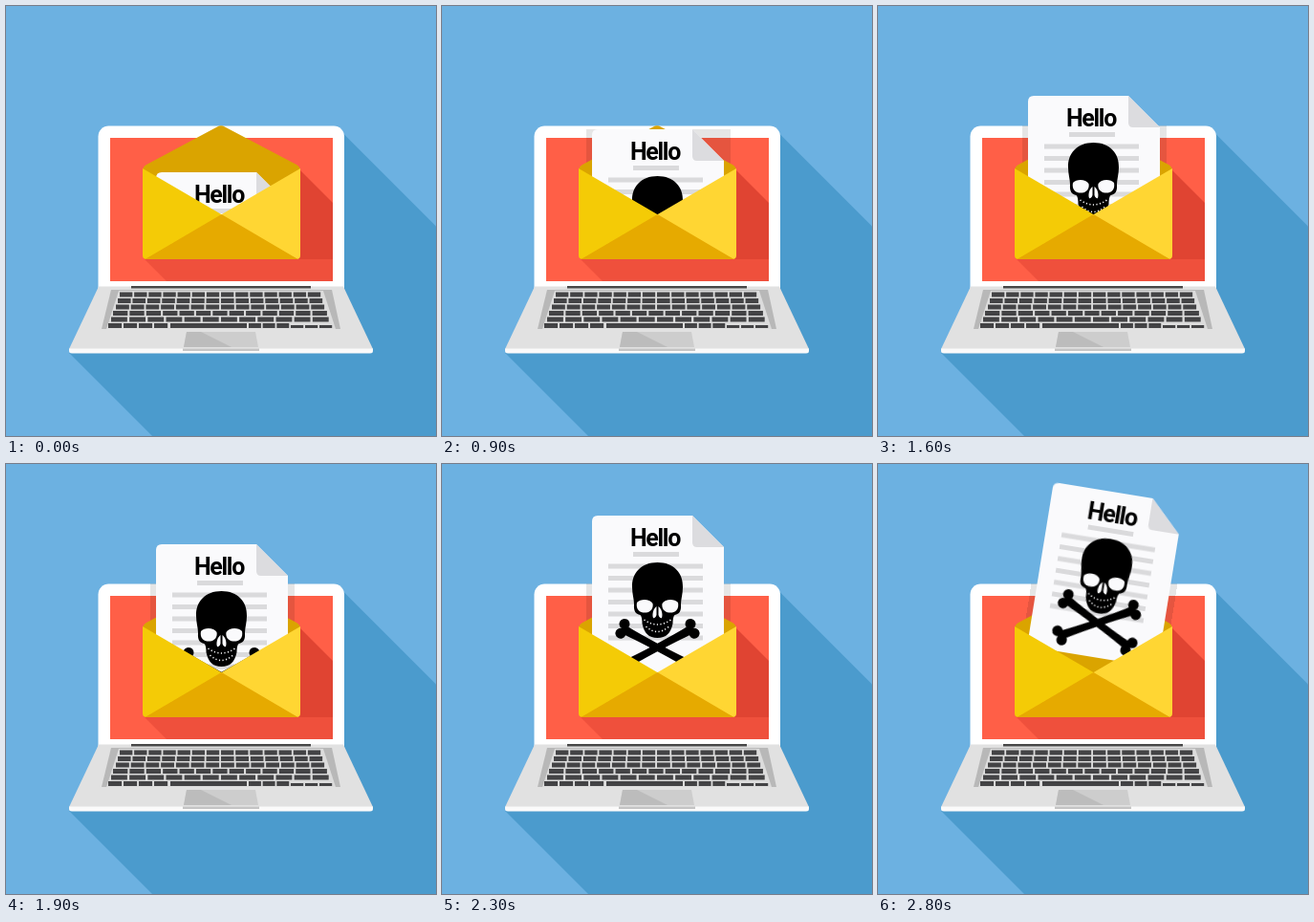
Recreate the animation shown at these times as an HTML page. Size 450 by 450 pixels, loop 2.9 s.

```html
<!DOCTYPE html>
<html lang="en">
<head>
<meta charset="utf-8">
<title>Hello letter</title>
<style>
  html, body { margin: 0; width: 100%; height: 100%; overflow: hidden; background: #6cb1e1; }
  svg { display: block; width: 100vw; height: 100vh; }

  .letter { transform-origin: 226px 87px; animation: rise 2.9s infinite; }
  .hello { font: bold 25px Roboto, sans-serif; letter-spacing: -1.3px; text-anchor: middle; }
  .keys line { stroke: #434345; stroke-width: 5; stroke-dasharray: 8.8 1.2; }

  /* The letter climbs in 100 ms ticks, pauses once, then tilts. */
  @keyframes rise {
    0% { transform: translate(0, 174px) rotate(0deg); animation-timing-function: steps(17); }
    58.62% { transform: translate(0, 89px) rotate(0deg); animation-timing-function: step-end; }
    65.51% { transform: translate(0, 84px) rotate(0deg); animation-timing-function: steps(4); }
    79.31% { transform: translate(0, 54px) rotate(0deg); animation-timing-function: step-end; }
    82.75% { transform: translate(0, 49px) rotate(0deg); animation-timing-function: steps(4); }
    96.55%, 100% { transform: translate(12px, 29px) rotate(9.2deg); animation-timing-function: step-end; }
  }
</style>
</head>
<body>
<svg viewBox="0 0 450 450">
  <defs>
    <clipPath id="slot"><path d="M0 0H450V236H0z"/></clipPath>
    <clipPath id="lid"><path d="M97 125.500H354V236H97z"/></clipPath>
    <clipPath id="pocket"><rect x="143" y="160" width="165" height="105" rx="4"/></clipPath>
    <g id="bone">
      <path d="M-42-5Q-30-3.700 0-3.700T42-5V5Q30 3.700 0 3.700T-42 5z"/>
      <g id="knob"><circle cx="-42" cy="-5.500" r="5.500"/><circle cx="-41" cy="5" r="5.500"/></g>
      <use href="#knob" transform="scale(-1 1)"/>
    </g>
  </defs>

  <path fill="#6cb1e1" d="M0 0H450V450H0z"/>
  <path fill="#4b9bcd" d="M350 130.500L450 230.500V450H153L66 363z"/>

  <!-- laptop -->
  <rect x="96.500" y="125.500" width="257.500" height="180" rx="11" fill="#fff"/>
  <path fill="#ff5f47" d="M109 138H342V288H109z"/>
  <path fill="#ef503c" d="M144 264L168 288H342V264z"/>
  <path fill="#e04432" d="M302 166L342 206V265H302z"/>
  <path fill="#e1e1e1" d="M97 293.500H353L384 359H66z"/>
  <path fill="#484848" d="M131 293H319V295.500H131z"/>
  <path fill="#b8b8b8" d="M110 297H341L350 338H100z"/>
  <path fill="#dcdcdc" d="M118 298H332L345 338H105z"/>
  <g class="keys">
    <line x1="119" x2="331" y1="302" y2="302" pathLength="140"/>
    <line x1="117" x2="333" y1="308.500" y2="308.500" pathLength="140"/>
    <line x1="115" x2="335" y1="315" y2="315" pathLength="140"/>
    <line x1="112" x2="338" y1="321.500" y2="321.500" pathLength="130"/>
    <line x1="110" x2="340" y1="328" y2="328" pathLength="120"/>
    <line x1="107" x2="171" y1="334.500" y2="334.500" pathLength="40"/>
    <line x1="172" x2="252" y1="334.500" y2="334.500" style="stroke-dasharray:none"/>
    <line x1="254" x2="298" y1="334.500" y2="334.500" pathLength="30"/>
    <line x1="298" x2="343" y1="335.500" y2="335.500" pathLength="30" style="stroke-width:3"/>
  </g>
  <path fill="#cdcdcd" d="M189 341H261L264 357H186z"/>
  <path fill="#bcbcbc" d="M189 341H204L236 357H186z"/>
  <path fill="#fafafa" d="M66 358.500H384V361Q384 363.500 381 363.500H69Q66 363.500 66 361z"/>
  <path fill="#c4c4c4" d="M185 358.500H265V361H185z"/>

  <!-- envelope and letter -->
  <g clip-path="url(#lid)"><rect class="letter" x="151" width="151" height="174" opacity=".1"/></g>
  <path fill="#daa400" d="M143 173Q143 168 147 166L221 126.500Q225 124 229 126.500L304 166Q308 168 308 173V240H143z"/>
  <g clip-path="url(#slot)">
    <g class="letter">
      <path fill="#fafafc" d="M163 0H262L295 33V174H157V6Q157 0 163 0z"/>
      <path fill="#dcdcdf" d="M262 0L295 33H267Q262 33 262 28z"/>
      <text class="hello" x="223" y="31.500">Hello</text>
      <path stroke="#dadadc" stroke-width="5" d="M200 40.500H248M174 53H273M174 65.500H273M174 78H273M174 90.500H273M174 103H273M174 115.500H273M174 128H273"/>
      <g transform="translate(225.500 138)">
        <use href="#bone" transform="rotate(28)"/>
        <use href="#bone" transform="rotate(-28)"/>
      </g>
      <g transform="translate(225.500)">
        <path d="M0 49C17 49 27 60 26.500 75C26.500 82 24.500 87 24.500 93C25 100 23 103 18 104Q16 106 16 113C14 123 9 128 0 128S-14 123-16 113Q-16 106-18 104C-23 103-25 100-24.500 93C-24.500 87-26.500 82-26.500 75C-27 60-17 49 0 49z"/>
        <g fill="#fafafc">
          <path id="eye" d="M-21.500 91C-18 87-8 87-5 92C-4 97-7 101-12 101.500C-18 102-23 99-21.500 91z"/>
          <use href="#eye" transform="scale(-1 1)"/>
          <path d="M-1 95C-4 97-6 103-4.500 107Q-2 108-1 104zM1 95C4 97 6 103 4.500 107Q2 108 1 104z"/>
        </g>
        <path fill="none" stroke="#fafafc" stroke-width="1.500" stroke-dasharray="1.200 2.400" d="M-14 109Q0 119 14 109M-12 116Q0 127 12 116"/>
      </g>
    </g>
  </g>
  <g clip-path="url(#pocket)">
    <path fill="#f4cb06" d="M143 170L227 219L143 267z"/>
    <path fill="#ffd633" d="M308 170L224 219L308 267z"/>
    <path fill="#e6aa00" d="M143 266.500L225.500 218L308 266.500z"/>
  </g>
</svg>
</body>
</html>
```
